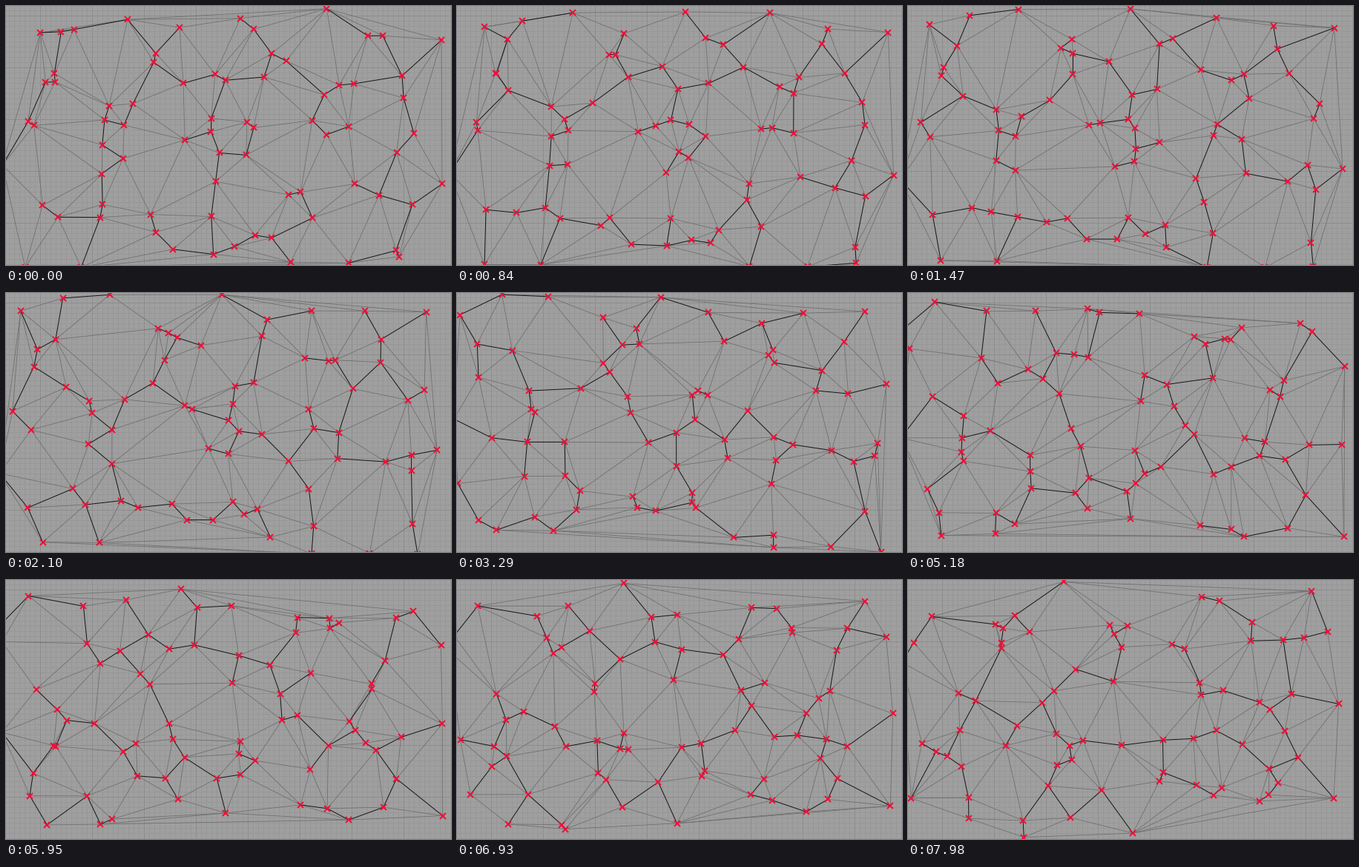
Recreate the animation shown at these times as a matplotlib script. Size 600 px wide and 350 px high, loop 8000 ms.

```python
import numpy as np
import matplotlib.pyplot as plt
from matplotlib.animation import FuncAnimation
from matplotlib.collections import LineCollection
from matplotlib.tri import Triangulation

W, H, DPI = 600, 350, 100
STEP_MS, TICK_MS, LOOP_MS = 70, 20, 8000

# Honeycomb lattice: every node circles its own lattice site.
SIDE = 44.25
COL_STEP = 38.25
ROW_STEP = 1.5 * SIDE
ORIGIN = (21, 44.5)
TURN = np.pi / 100          # radians per step
RADIUS = 1 / TURN           # one pixel per step

# Starting angle in degrees of each node, one row per zigzag.
PHASES = np.radians([
    [39, 4, 138, 29.5, -39, 250, 122, 33, -15, 175.5, 215, 108, 30, 191.5, 18.4],
    [-5, 80, 184, 264, 264, 34.5, 14.3, 247, 180, 124, -38, 33, 192, 61.5, 229],
    [59.6, 161, 2, 85, 118.6, -27, 36.8, 267, 95, 176, 28, 157.5, 125.7, -10.5, 197],
    [145.4, -71, 11.5, 253, 121.7, 236, -7.7, 247, 96.6, 6.8, 223.6, 27.6, -45, -24.7, -13.5],
    [-82.3, 109, -84, 101, 30, -67, -26, -54, 15, 199, 230.6, 156, 234, -77, 212.5],
])

rows, cols = np.indices(PHASES.shape)
zigzag = np.where((rows + cols) % 2 == 0, SIDE / 4, -SIDE / 4)
site_x = ORIGIN[0] + COL_STEP * cols
site_y = ORIGIN[1] + ROW_STEP * rows + zigzag


def nodes(step):
    angle = PHASES + TURN * step
    x = site_x + RADIUS * np.cos(angle)
    y = site_y - RADIUS * np.sin(angle)
    return np.column_stack([x.ravel(), y.ravel()])


def spanning_tree(pts, edges):
    """Kruskal: mask of the edges in the shortest tree."""
    length = np.hypot(*(pts[edges[:, 0]] - pts[edges[:, 1]]).T)
    parent = list(range(len(pts)))

    def root(i):
        while parent[i] != i:
            parent[i] = parent[parent[i]]
            i = parent[i]
        return i

    mask = np.zeros(len(edges), bool)
    for k in np.argsort(length):
        a, b = root(edges[k, 0]), root(edges[k, 1])
        if a != b:
            parent[a] = b
            mask[k] = True
    return mask


def graph_paper():
    paper = np.full((H, W), 159, np.uint8)
    for gap, shade in ((7, 151), (70, 141)):
        paper[13 % gap::gap, :] = shade
        paper[:, 46 % gap::gap] = shade
    return np.dstack([paper] * 3)


fig = plt.figure(figsize=(W / DPI, H / DPI), dpi=DPI)
ax = fig.add_axes([0, 0, 1, 1])
ax.imshow(graph_paper(), interpolation="nearest", aspect="auto")
ax.set_xlim(-0.5, W - 0.5)
ax.set_ylim(H - 0.5, -0.5)
ax.axis("off")

px = 72 / DPI
mesh = LineCollection([], colors="#6e6e6e", linewidths=0.8 * px, zorder=2)
tree = LineCollection([], colors="#161616", linewidths=1.0 * px, zorder=3)
ax.add_collection(mesh, autolim=False)
ax.add_collection(tree, autolim=False)
marks, = ax.plot([], [], "x", color="#ee1038", ms=8 * px, mew=2 * px, zorder=4)


def draw(tick):
    step = (tick * TICK_MS + TICK_MS // 2) // STEP_MS
    pts = nodes(step)
    edges = Triangulation(*pts.T).edges
    in_tree = spanning_tree(pts, edges)
    mesh.set_segments(pts[edges[~in_tree]])
    tree.set_segments(pts[edges[in_tree]])
    marks.set_data(*pts.T)
    return mesh, tree, marks


anim = FuncAnimation(fig, draw, frames=LOOP_MS // TICK_MS, interval=TICK_MS,
                     init_func=lambda: draw(0), repeat=True, repeat_delay=0)
plt.show()
```
